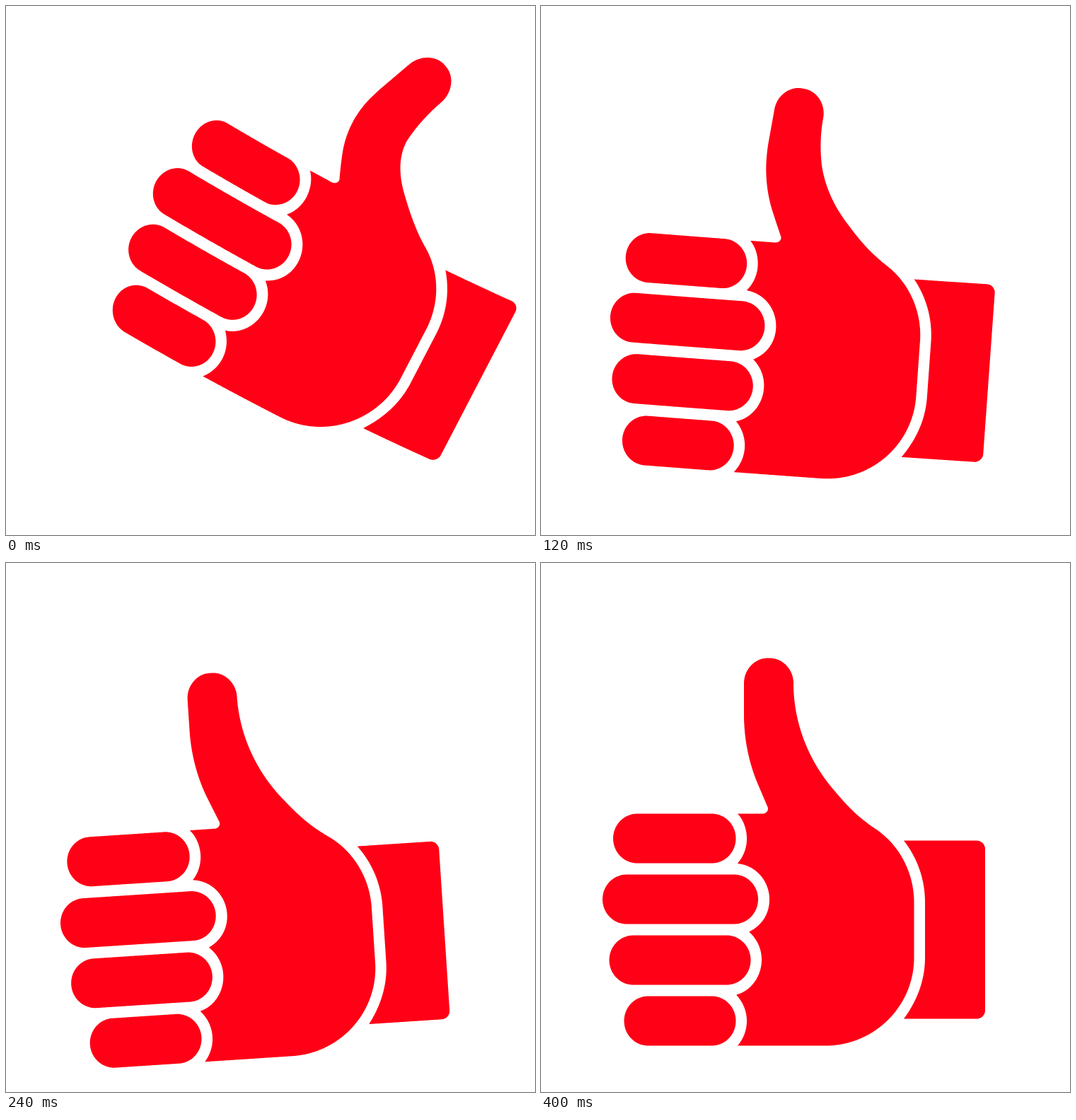
Animation of 748x748 px, one loop 1440 ms. Source, as an HTML page:

```html
<!DOCTYPE html>
<html lang="en">
<head>
<meta charset="utf-8">
<title>Thumbs up</title>
<style>
  html, body { margin: 0; width: 100%; height: 100%; overflow: hidden; background: #fff; }
  svg { display: block; width: 100vw; height: 100vh; }
  path { fill: #ff0016; }
</style>
</head>
<body>
<svg viewBox="0 0 748 748"><path id="hand"/></svg>
<script>
const LOOP = 1440, STEP = 20, SWING = 240, SETTLE = 400;
const START = 27.5, OVER = -3.75;
const PIVOT = { x: 628, y: 644.5 };

const finger = (x, y, right, r = 34) =>
  `M${x + r},${y}H${right - r}a${r},35 0 0 1 0,70H${x + r}a${r},35 0 0 1 0,-70Z`;

const palm = `M278,682.5H402C471,682.5 527.5,627 527.5,558V480
  C527.5,437 506,398 473,376C446,358 430,340 415,322C379,281 357,227 357,170
  C357,150 341,134.5 324,134.5H320C303,134.5 287,150 287,170V215
  C287,251 295,285 306,311L320,344C323,349 319,354.5 313,354.5H278
  C286,363 291,376 291,390C291,403 286,416 277.5,425
  C303,427 323,449 323,476C323,496 312,513 294,521.5
  C305,531 312,545 312,561C312,586 295,606 276,610.5
  C285,620 291,633 291,647.5C291,661 286,673 278,682.5Z`;

const cuff = `M513,392.5H616a12,12 0 0 1 12,12V632.5a12,12 0 0 1 -12,12H513
  C531,620 543,591 543,558V480C543,447 532,417 513,392.5Z`;

const parts = [
  finger(102, 354.5, 275.5), finger(87, 440.5, 307),
  finger(96.5, 526.5, 296.5), finger(117.5, 612.5, 275.5), palm, cuff
];

function sample(d) {
  const path = document.createElementNS("http://www.w3.org/2000/svg", "path");
  path.setAttribute("d", d);
  const length = path.getTotalLength(), count = Math.ceil(length / 1.5);
  return Array.from({ length: count }, (_, i) => path.getPointAtLength(length * i / count));
}
const outlines = parts.map(sample);

// Soft bend of the hand: the thumb curls back, the palm slides a little.
function bend({ x, y }, amount) {
  if (amount <= 0) return { x, y };
  const slide = amount ** 0.8, sag = amount ** 1.1, curl = amount ** 0.7;
  let dx = -16 * slide;
  let dy = (17 - 7.5 * ((x - 368) / 260) ** 2) * sag;
  if (x < 260 && y < 600) dx += 6 * (260 - x) / 125 * (600 - y) / 200 * slide;
  if (y < 360) {
    const rise = 360 - y, curved = Math.min(rise, 125);
    const rate = 8.7e-6 * curl, slope = 3 * rate * curved ** 2;
    const angle = Math.atan(slope), side = x - 322;
    dx += rate * curved ** 3 + slope * (rise - curved);
    dx += side * (Math.cos(angle) - 1);
    dy += side * Math.sin(angle);
  }
  return { x: x + dx, y: y + dy };
}

// Cubic easing with level ends; a and b are the handles in time.
function ease(t, a, b) {
  let low = 0, high = 1, u = t;
  for (let i = 0; i < 30; i++) {
    u = (low + high) / 2;
    const x = 3 * a * u * (1 - u) ** 2 + 3 * b * u * u * (1 - u) + u ** 3;
    if (x < t) low = u; else high = u;
  }
  return u * u * (3 - 2 * u);
}

function angleAt(ms) {
  if (ms <= 0) return START;
  if (ms < SWING) return START + (OVER - START) * ease(ms / SWING, 0.32, 0.285);
  if (ms < SETTLE) return OVER * (1 - ease((ms - SWING) / (SETTLE - SWING), 0.333, 0.667));
  return 0;
}

const hand = document.getElementById("hand");

function draw(ms) {
  const degrees = angleAt(ms), turn = degrees * Math.PI / 180;
  const cos = Math.cos(turn), sin = Math.sin(turn);
  const place = point => {
    const p = bend(point, degrees / START);
    const x = p.x - PIVOT.x, y = p.y - PIVOT.y;
    return (PIVOT.x + x * cos - y * sin).toFixed(2) + "," + (PIVOT.y + x * sin + y * cos).toFixed(2);
  };
  hand.setAttribute("d", outlines.map(o => "M" + o.map(place).join("L") + "Z").join(""));
}

const begin = performance.now();
let shown = -1;

function tick() {
  const time = Math.max(0, performance.now() - begin) % LOOP;
  const ms = Math.min(SETTLE, Math.floor(time / STEP) * STEP);
  if (ms !== shown) draw(shown = ms);
  requestAnimationFrame(tick);
}
tick();
</script>
</body>
</html>
```
